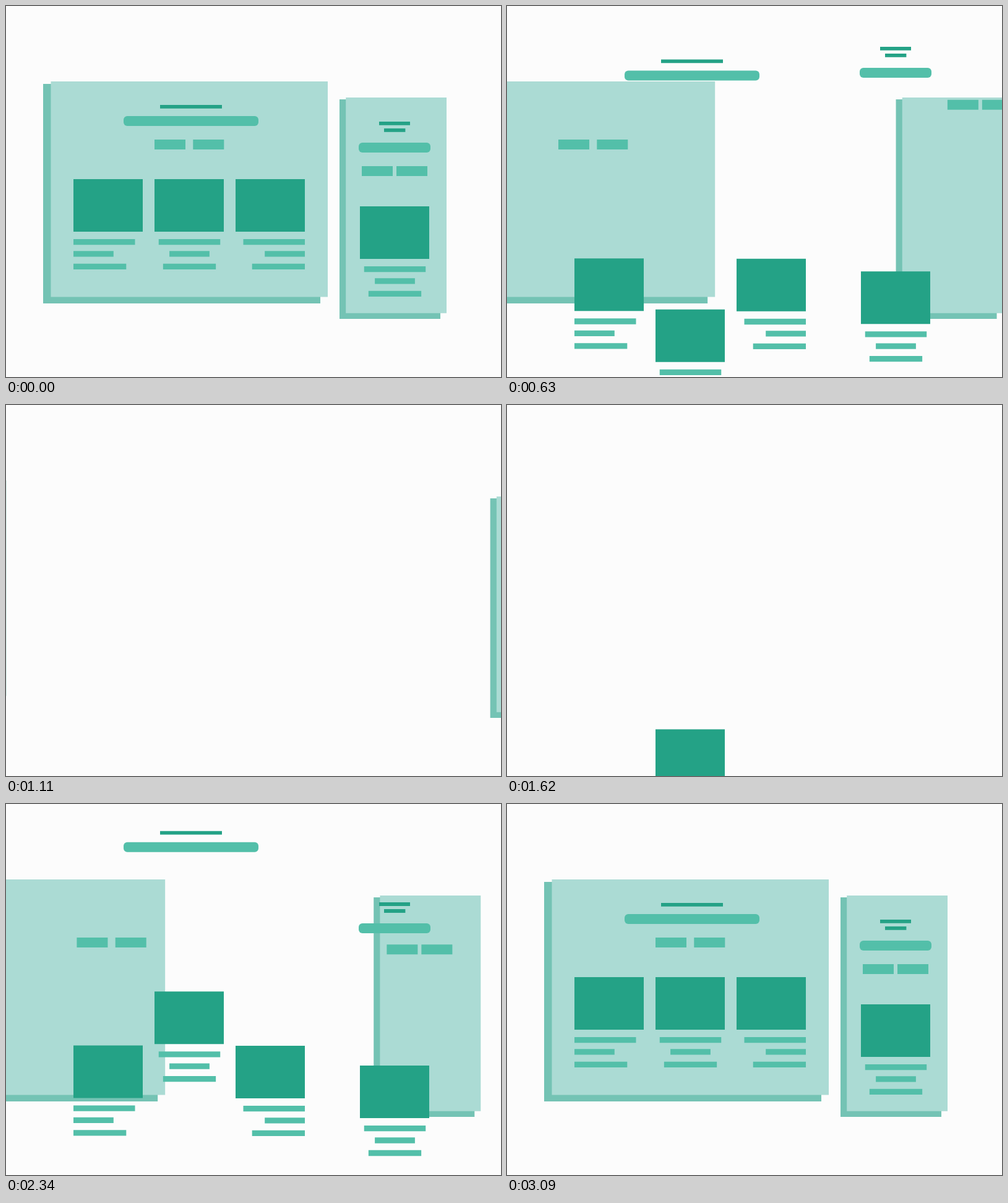
An HTML page with a canvas for the animation above (3360 ms loop, 800 px wide and 600 px high).

```html
<!DOCTYPE html>
<html lang="en">
<head>
<meta charset="utf-8">
<title>Layout loop</title>
<style>
  html, body { margin: 0; width: 100%; height: 100%; overflow: hidden; background: #fcfcfc; }
  canvas { display: block; }
</style>
</head>
<body>
<canvas id="stage" width="800" height="600"></canvas>
<script>
const ctx = document.getElementById('stage').getContext('2d');
const LOOP = 3360, STEP = 30, START = 150;
const PANEL = '#abdbd4', SHADE = '#74c3b4', DARK = '#24a286', MID = '#53bfa9';

function rect(color, x, y, w, h, r = 0) {
  ctx.fillStyle = color;
  ctx.beginPath();
  ctx.roundRect(x, y, w, h, r);
  ctx.fill();
}

// A picture block with three text lines; align is 0 left, 0.5 centre, 1 right.
function card(x, y, align) {
  rect(DARK, x, y, 112, 85);
  [[99.5, 97], [64.8, 116.3], [85.3, 136.8]].forEach(([w, dy]) =>
    rect(MID, x + (112 - w) * align + (align === 0.5 ? 0.5 : 0), y + dy, w, 9.3));
}

function buttons(x, y, gap) {
  rect(MID, x, y, 50, 16);
  rect(MID, x + 50 + gap, y, 50, 16);
}

// Each part moves away by (dx, dy) until `turn`, then returns home by `end`.
const parts = [
  { dx: -684, dy: 0, turn: 1560, end: 2910, draw() {
    rect(SHADE, 60, 126, 448, 355);
    rect(PANEL, 72.5, 122, 447.5, 348.5);
  } },
  { dx: 298, dy: 0, turn: 1470, end: 2670, draw() {
    rect(SHADE, 539, 151, 163, 355);
    rect(PANEL, 549.2, 148, 162.8, 348.7);
  } },
  { dx: 0, dy: -254, turn: 1500, end: 3090, draw() {
    rect(DARK, 249, 160, 100, 5.8);
    rect(MID, 190, 178, 218, 16, 6);
  } },
  { dx: -428, dy: 0, turn: 1320, end: 2910, draw: () => buttons(240, 216, 12.3) },
  { dx: 0, dy: 364.6, turn: 1350, end: 2910, draw: () => card(109, 280, 0) },
  { dx: 0, dy: 365, turn: 1020, end: 2580, draw: () => card(240, 280, 0.5) },
  { dx: 0, dy: 366, turn: 1350, end: 2910, draw: () => card(371, 280, 1) },
  { dx: 0, dy: -344, turn: 1350, end: 2550, draw() {
    rect(DARK, 603, 187, 50, 5.8);
    rect(DARK, 611, 198, 34.4, 5.8);
    rect(MID, 570, 221, 116, 16, 6);
  } },
  { dx: 314, dy: -246, turn: 1200, end: 2670, draw: () => buttons(575, 259, 6) },
  { dx: 0, dy: 324, turn: 1410, end: 2880, draw: () => card(572, 324, 0.5) }
];

function ease(u) {
  u = Math.min(1, Math.max(0, u));
  return u * u * (3 - 2 * u);
}

function frame(now) {
  const t = Math.floor(now % LOOP / STEP) * STEP;
  rect('#fcfcfc', 0, 0, 800, 600);
  for (const { dx, dy, turn, end, draw } of parts) {
    const away = t < turn
      ? ease((t - START) / (turn - START))
      : ease((end - t) / (end - turn));
    ctx.save();
    ctx.translate(dx * away, dy * away);
    draw();
    ctx.restore();
  }
  requestAnimationFrame(() => frame(performance.now()));
}
frame(0);
</script>
</body>
</html>
```
